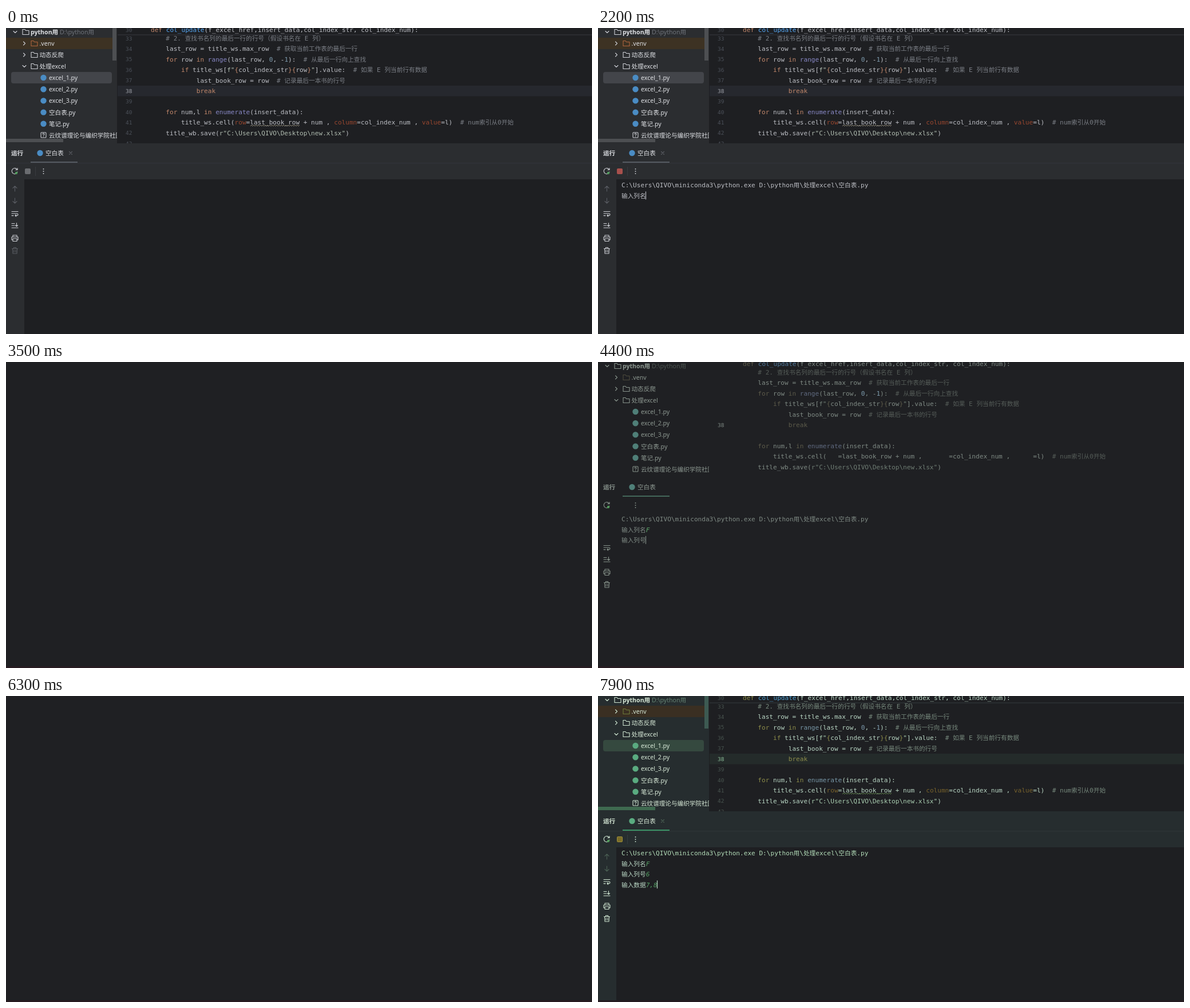
Animation of 1024 by 536 pixels, one loop 8000 ms. Source, as an HTML page:

```html
<!DOCTYPE html>
<html lang="zh">
<head>
<meta charset="utf-8">
<style>
html, body { margin: 0; width: 100%; height: 100%; overflow: hidden; background: #1e1f22; }
svg { display: block; width: 100%; height: 100%; }
text { white-space: pre; fill: var(--fg); }
.mono { font: 11.1px "DejaVu Sans Mono", monospace; }
.ui { font: 10.6px "Noto Sans", "Noto Sans CJK SC", sans-serif; fill: var(--txt); }
.gutter { font: 9.5px "DejaVu Sans Mono", monospace; fill: var(--num); }
.cjk { font-family: "Noto Sans CJK SC", "Noto Sans CJK", sans-serif; font-size: 10.67px; }
.bold { font-weight: 700; }
.dim { fill: var(--dim); }
.now { fill: var(--now); }
.cm { fill: var(--cm); } .str { fill: var(--str); } .kw { fill: var(--kw); }
.arg { fill: var(--arg); } .bi { fill: var(--bi); } .int { fill: var(--int); } .fn { fill: var(--fn); }
.typed { font-style: italic; fill: var(--typed); }
.icon { fill: none; stroke: var(--ic); stroke-width: 1.1; stroke-linecap: round; stroke-linejoin: round; }
.faint { stroke: var(--icd); }
</style>
</head>
<body>
<svg id="stage" viewBox="0 0 1024 536" preserveAspectRatio="none"></svg>
<script>
const CHAR = 6.68, CJK = 10.67;
const stage = document.getElementById('stage');

const rect = (x, y, w, h, color, extra = '') =>
  `<rect x="${x}" y="${y}" width="${w}" height="${h}" fill="var(--${color})" ${extra}/>`;
const icon = (d, cls = '', extra = '') => `<path class="icon ${cls}" d="${d}" ${extra}/>`;
const wrapCjk = s => s.replace(/[\u3000-\u9fff\uff00-\uffef]+/g, m => `<tspan class="cjk">${m}</tspan>`);
const text = (x, y, s, cls) => `<text x="${x}" y="${y}" class="${cls}">${s}</text>`;

// Syntax colouring
const kinds = ['cm', 'str', 'kw', 'arg', 'bi', 'int', 'fn'];
const syntax = /(#.*)|([rf]"[^{"]*"?|"(?=\]))|(\b(?:def|for|in|if|break)\b|[{}])|(\b(?:row|column|value)(?==\w))|(\b(?:range|enumerate)\b)|(\b\d+\b)|(\bcol_update\b)/g;
const paint = s => s.replace(syntax, (m, ...groups) =>
  `<tspan class="${kinds[groups.slice(0, 7).findIndex(Boolean)]}">${wrapCjk(m)}</tspan>`);

const code = [
  '# 2. 查找书名列的最后一行的行号（假设书名在 E 列）',
  'last_row = title_ws.max_row  # 获取当前工作表的最后一行',
  'for row in range(last_row, 0, -1):  # 从最后一行向上查找',
  '    if title_ws[f"{col_index_str}{row}"].value:  # 如果 E 列当前行有数据',
  '        last_book_row = row  # 记录最后一本书的行号',
  '        break',
  '',
  'for num,l in enumerate(insert_data):',
  '    title_ws.cell(row=last_book_row + num , column=col_index_num , value=l)  # num索引从0开始',
  String.raw`title_wb.save(r"C:\Users\QIVO\Desktop\new.xlsx")`,
  ''
];

function editor() {
  let out = rect(195, 101, 829, 18.5, 'cur');
  out += text(209, 6.5, 30, 'gutter');
  out += text(253, 7, paint('def col_update(f_excel_href,insert_data,col_index_str, col_index_num):'), 'mono');
  out += rect(195, 11.5, 829, 1, 'line');
  code.forEach((line, i) => {
    const y = 22 + i * 18.43, n = 33 + i;
    out += text(209, y - .5, n, n === 38 ? 'gutter now' : 'gutter');
    out += text(279.3, y, paint(line), 'mono');
  });
  const wave = Array.from({ length: 44 }, (_, i) => `${427 + i * 2},${i % 2 ? 170 : 172}`).join(' ');
  return out + `<polyline points="${wave}" fill="none" stroke="var(--wave)" stroke-width=".8"/>`;
}

const chevron = (x, y, open) => icon(open ? `M${x - 3} ${y - 1.5}l3 3l3-3` : `M${x - 1.5} ${y - 3}l3 3l-3 3`);
const folder = (x, y, cls) => icon(`M${x} ${y - 4.5}h4l1.5 2h5.5v7h-11z`, cls);
const logo = (x, y) => `<circle cx="${x}" cy="${y}" r="5.2" fill="var(--py)"/>`;

function tree() {
  let out = rect(0, 17, 187, 20, 'venv') + rect(9, 77, 176, 20, 'sel', 'rx="4"');
  out += chevron(16, 7, true) + folder(29, 7) + text(43, 11, 'python用', 'ui bold');
  out += text(94, 11, 'D:\\python用', 'ui dim');
  [['.venv', 27], ['动态反爬', 47], ['处理excel', 67]].forEach(([name, y], i) => {
    out += chevron(32, y, i === 2) + folder(44, y, i ? '' : 'venvIcon') + text(58.5, y + 4, name, 'ui');
  });
  ['excel_1.py', 'excel_2.py', 'excel_3.py', '空白表.py', '笔记.py'].forEach((name, i) => {
    const y = 87 + i * 20.2;
    out += logo(65.5, y) + text(75, y + 4, name, 'ui');
  });
  out += icon('M62 183h7q1 0 1 1v7q0 1-1 1h-7q-1 0-1-1v-7q0-1 1-1zM64 186q0-1.5 1.5-1.5t1.5 1.5q0 1-1.5 2M65.5 190v.2');
  out += text(75, 192, '云纹谱理论与编织学院社团', 'ui');
  return out + rect(186, 0, 7, 57, 'sb') + rect(0, 194, 100, 6, 'hsb');
}

function toolWindow() {
  let out = text(9, 223, '运行', 'ui bold') + logo(59.5, 219) + text(69, 223, '空白表', 'ui');
  out += icon('M110.5 216.5l5 5m0-5l-5 5', 'faint') + rect(43, 234, 82, 2, 'tab');
  out += rect(0, 236.5, 1024, .7, 'line') + rect(51, 243, 1, 16, 'line');
  out += icon('M19.5 248a5 5 0 1 0 .5 4M20 245.5v3h-3') + `<circle cx="18" cy="254" r="2.2" fill="var(--run)"/>`;
  out += rect(33.5, 246.5, 9, 9, 'stop', 'rx="1" stroke="var(--stopEdge)"');
  [247, 251, 255].forEach(y => out += `<circle cx="65.5" cy="${y}" r=".9" fill="var(--ic)"/>`);
  out += icon('M15.5 286v-9m-3.5 3.5l3.5-3.5l3.5 3.5', 'faint');
  out += icon('M15.5 298v9m-3.5-3.5l3.5 3.5l3.5-3.5', 'faint');
  out += icon('M10 321.5h11M10 325h9q2 0 2 1.8t-2 1.8h-3m1.5-1.6l-1.6 1.6l1.6 1.6M10 328.6h3');
  out += icon('M10 342.5h5M10 346h5M10 350h11M18.5 341.5v6m-2-2l2 2l2-2');
  out += icon('M12 366v-3h7v3M12 371h-2v-5h11v5h-2M12 369h7v4.5h-7z');
  out += icon('M10.5 386.5h10M13.5 386v-1.5h4v1.5M11.5 386.5l.5 8.5h7l.5-8.5M14 389v3.5M17 389v3.5', '', 'id="trash"');
  return out;
}

// Console entries: text, left edge, row, width
const prompt = 41 + 4 * CJK;
const entries = [
  [String.raw`C:\Users\QIVO\miniconda3\python.exe D:\python用\处理excel\空白表.py`, 41, 0, 431],
  ['输入列名', 41, 1, 4 * CJK], ['F', prompt, 1, CHAR],
  ['输入列号', 41, 2, 4 * CJK], ['6', prompt, 2, CHAR],
  ['输入数据', 41, 3, 4 * CJK], ['7', prompt, 3, CHAR],
  [',', prompt + CHAR, 3, CHAR], ['8', prompt + 2 * CHAR, 3, CHAR]
];
const rowY = row => 279.3 + row * 18.4;
const consoleText = () => entries.map(([s, x, row], i) =>
  text(x, rowY(row), wrapCjk(s), 'mono entry' + (s.length === 1 ? ' typed' : i ? '' : ' path'))).join('');

stage.innerHTML = `
  <defs>
    <clipPath id="left"><path d="M0 0h194v202H0z"/></clipPath>
    <clipPath id="right"><path d="M194 0h830v202H194z"/></clipPath>
  </defs>
  ${rect(0, 0, 1024, 536, 'bar')}${rect(194, 0, 830, 202, 'ed')}${rect(32, 265, 992, 271, 'ed')}
  <g id="ink">
    <g clip-path="url(#left)">${tree()}</g>
    <g clip-path="url(#right)">${editor()}</g>
    ${toolWindow()}${consoleText()}
    <rect id="caret" width="1.2" height="14" fill="var(--fg)"/>
  </g>
  ${rect(0, 533, 1024, 3, 'foot')}
  <style>.venvIcon{stroke:var(--venvIc)}.path{fill:var(--path)}</style>`;

const none = 'transparent';
const plain = {
  bar: '#2b2d30', ed: '#1e1f22', line: '#393b40', cur: '#26282e', venv: '#3d3223', sel: '#43454a',
  sb: '#4d4f52', hsb: '#4d4f52', txt: '#dfe1e5', dim: '#6f737a', fg: '#bcbec4', num: '#4b5059', now: '#a1a3ab',
  cm: '#7a7e85', str: '#b0bcb0', kw: '#c0866a', arg: '#99472f', bi: '#8888c6', int: '#7f9db0', fn: '#56a8f5',
  ic: '#ced0d6', icd: '#5a5d63', venvIc: '#b0653f', py: '#4a8cc4', tab: '#565b62', run: '#4f9a5a',
  stop: '#6a6c70', stopEdge: '#6a6c70', wave: '#a8a08a', path: '#bcbec4', typed: '#5fa86b', foot: none
};
const green = {
  ...plain, bar: '#1f2a34', line: '#30404a', cur: '#24282c', venv: '#3a2f22', sel: '#35493f', sb: '#3d5a52', hsb: '#57583a',
  txt: '#d8ead8', dim: '#648272', fg: '#b9d6c4', num: '#48544f', now: '#8fc29c', cm: '#76887c', str: '#a9cdb0',
  kw: '#8c8c4a', arg: '#79632c', bi: '#7898a8', fn: '#4f9fd0', ic: '#cfe6d2', icd: '#4b6054', venvIc: '#6d7a3a',
  py: '#5aab80', tab: '#3c9467', stop: '#7a6c28', stopEdge: '#a0913a', wave: '#6f9a58', path: '#b2dcb8', typed: '#55a065', foot: '#251c22'
};
const moss = { ...green, bar: '#262d2f', line: '#343d3e', cur: '#242b2a', hsb: '#3f6a50' };
const running = { ...plain, stop: '#a8504c', stopEdge: '#a8504c' };
const flat = { line: none, cur: none, venv: none, sel: none, sb: none, hsb: none, num: none, stop: none, foot: '#271c22' };
const blue = {
  ...flat, bar: '#2d3341', ed: '#2d3341', line: '#151922', sb: '#2d4470', hsb: '#2d4470', txt: '#3574f0', dim: '#2e4878',
  fg: '#3574e6', num: '#2f3c55', now: '#3574e6', cm: '#2f5299', str: '#2f589f', kw: '#2e4c86', arg: none, bi: '#3368c4',
  int: '#3368c4', fn: '#3574e6', ic: '#3574f0', icd: '#2f4063', venvIc: '#2e4470', py: '#3574f0', tab: '#3574f0',
  run: '#3574f0', stopEdge: '#2e4878', wave: none, path: '#3574e6', typed: '#3574e6'
};
const ghost = {
  ...plain, ...flat, bar: '#1f2023', ed: '#1f2023', txt: '#8d9891', fg: '#7f8a84', dim: '#4c5450', cm: '#555c58',
  str: '#6f7d74', kw: '#5c5a4a', arg: none, bi: '#606a80', fn: '#50789a', ic: '#87938b', icd: none, venvIc: '#4c4a3c',
  py: '#4f7f78', tab: '#44685a', stopEdge: none, wave: none, path: '#7f8a84', now: '#7f8a84'
};
const paleGhost = { ...ghost, bar: '#2b292e', ed: '#282a2d' };
const blank = c => ({ bar: c, ed: c, foot: '#271c22', empty: true });
const dark = blank('#1f2023');

// Start time, look, number of console entries
const steps = [
  [0, plain, 0], [300, running, 0], [800, running, 1], [1200, running, 2],
  [1300, paleGhost, 2], [1800, { ...dark, bar: '#2b292e', ed: '#282a2d' }, 2], [2200, running, 2],
  [2600, blank('#2d3341'), 2], [2700, blue, 2], [3500, dark, 2], [3600, green, 3],
  [4400, ghost, 4], [4600, dark, 4], [5200, green, 5], [5500, dark, 5],
  [5700, ghost, 6], [6300, dark, 6], [6700, moss, 6], [7200, moss, 7], [7600, moss, 8], [7900, moss, 9]
];

const ink = document.getElementById('ink');
const caret = document.getElementById('caret');
const trash = document.getElementById('trash');
const lines = [...stage.querySelectorAll('.entry')];
let shown;

function show([, look, count]) {
  for (const [key, color] of Object.entries(look)) stage.style.setProperty('--' + key, color);
  ink.style.display = look.empty ? 'none' : '';
  lines.forEach((el, i) => el.style.display = i < count ? '' : 'none');
  trash.classList.toggle('faint', count === 0);
  caret.style.display = count > 1 ? '' : 'none';
  if (count > 1) {
    const [, x, row, width] = entries[count - 1];
    caret.setAttribute('x', x + width - .8);
    caret.setAttribute('y', rowY(row) - 11.3);
  }
}

function tick() {
  const t = performance.now() % 8000;
  const step = steps.findLast(s => s[0] <= t);
  if (step !== shown) show(shown = step);
  requestAnimationFrame(tick);
}
tick();
</script>
</body>
</html>
```
